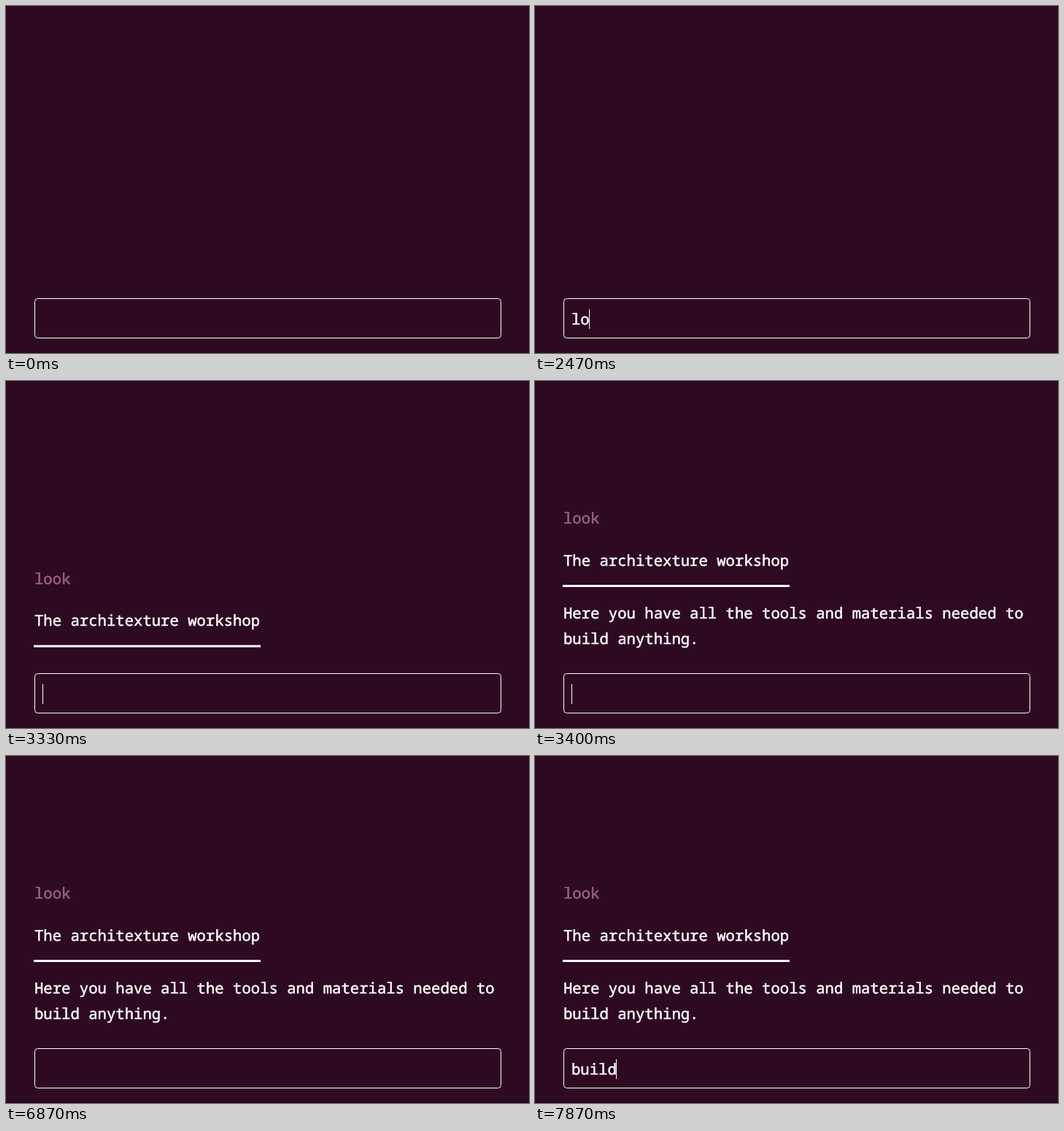
Write an HTML page that moves like this. It is 717 px wide and 475 px high and loops after 8000 ms.

```html
<!DOCTYPE html>
<html lang="en">
<head>
<meta charset="utf-8">
<title>Text adventure</title>
<style>
  html, body { margin: 0; width: 100%; height: 100%; overflow: hidden; background: #2e0a22; }
  svg { display: block; }
  text {
    font: 500 20.62px "Noto Sans Mono", "DejaVu Sans Mono", monospace;
    fill: #fff;
    stroke: #fff;
    stroke-width: .5px;
    text-rendering: geometricPrecision;
  }
  #echo { fill: #9b6289; stroke: #9b6289; }
</style>
</head>
<body>
<svg width="717" height="475" viewBox="0 0 717 475">
  <g id="log">
    <text id="echo" x="39" y="195">look</text>
    <g id="room">
      <text x="39" y="252.5">The architexture workshop</text>
      <rect x="38" y="279" width="311" height="3" fill="#fff"/>
    </g>
    <g id="story">
      <text x="39" y="325">Here you have all the tools and materials needed to</text>
      <text x="39" y="360">build anything.</text>
    </g>
  </g>
  <rect x="39.5" y="400.5" width="639" height="54" rx="4" fill="none" stroke="#fff"/>
  <text id="input" x="50" y="436"></text>
  <rect id="caret" y="415" width="1" height="27" fill="#fff"/>
</svg>
<script>
const LOOP = 8000, FPS = 15, ADVANCE = 12.372;
const FOCUS = 15, PRINT = 49;   // in ticks of 1/15 s
const KEYS = "look\nbuild", PRESSED = [32, 37, 40, 43, 46, 106, 108, 110, 115, 118];

const $ = id => document.getElementById(id);
const [log, echo, room, story, input, caret] =
  ["log", "echo", "room", "story", "input", "caret"].map($);

const show = (el, on) => el.setAttribute("visibility", on ? "visible" : "hidden");
const blinks = n => Math.floor((n - 21.95) / 8.012);

// A steady timer toggles the caret; every key press turns it on.
function caretOn(n, count) {
  const last = count ? PRESSED[count - 1] : FOCUS;
  return n >= FOCUS && (blinks(n) - blinks(last)) % 2 === 0;
}

function draw(t) {
  const n = Math.floor((t + 4) * FPS / 1000);
  const count = PRESSED.filter(p => p <= n).length;
  const word = KEYS.slice(0, count).split("\n").pop();
  const blocks = Math.max(0, Math.min(3, n - PRINT + 1));

  input.textContent = word;
  caret.setAttribute("x", Math.floor(50 + word.length * ADVANCE));
  show(caret, caretOn(n, count));
  [echo, room, story].forEach((el, i) => show(el, blocks > i));
  // each new block pushes the log up
  log.setAttribute("transform", `translate(0 ${(3 - blocks) * 82.5})`);
}

const start = performance.now();
function tick() {
  draw((performance.now() - start) % LOOP);
  requestAnimationFrame(tick);
}
tick();
</script>
</body>
</html>
```
